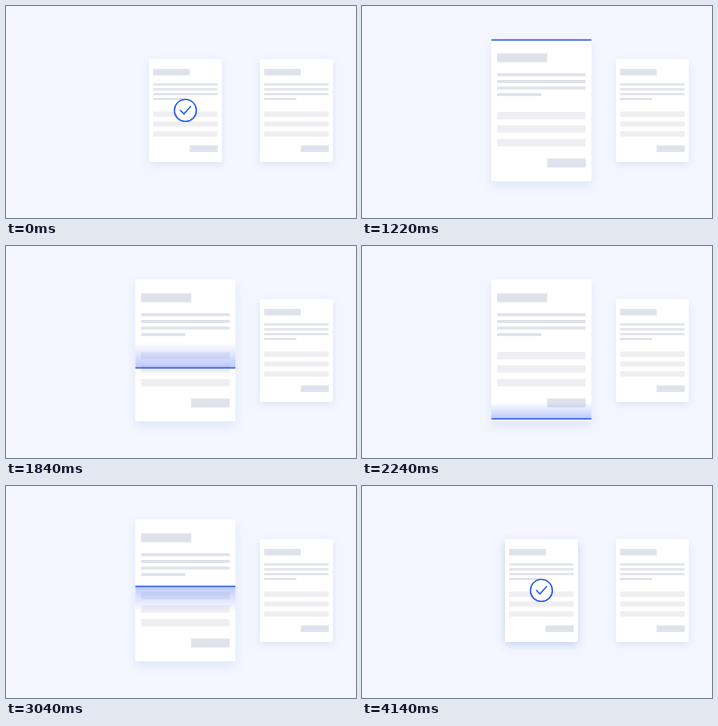
Recreate the animation shown at these times as an HTML page. Size 350 px wide and 212 px high, loop 4.2 s.

```html
<!DOCTYPE html>
<html lang="en">
<head>
<meta charset="utf-8">
<title>Document scan</title>
<style>
html, body { margin: 0; width: 100%; height: 100%; overflow: hidden; background: #f4f7ff; }
svg { display: block; width: 350px; height: 212px; }
.paper { fill: #fff; filter: drop-shadow(0 3px 4px rgba(70, 100, 190, .13)); }
.ink { fill: #dfe1eb; }
.field { fill: #efeff3; }
</style>
</head>
<body>
<svg viewBox="0 0 350 212">
  <defs>
    <!-- Page centred on its own origin -->
    <g id="page">
      <rect class="paper" x="-36.4" y="-51.5" width="72.8" height="103" rx=".8"/>
      <g class="ink">
        <rect x="-32.2" y="-41.5" width="36.5" height="6.5"/>
        <rect x="-32.2" y="-27" width="64.4" height="2.1"/>
        <rect x="-32.2" y="-22.1" width="64.4" height="2.1"/>
        <rect x="-32.2" y="-17.3" width="64.4" height="2.1"/>
        <rect x="-32.2" y="-12.5" width="32.2" height="2.1"/>
        <rect x="4.2" y="35" width="28" height="6.5"/>
      </g>
      <g class="field">
        <rect x="-32.2" y="1.1" width="64.4" height="5.4"/>
        <rect x="-32.2" y="10.9" width="64.4" height="5.4"/>
        <rect x="-32.2" y="20.8" width="64.4" height="5.4"/>
      </g>
    </g>
    <linearGradient id="glow" x1="0" y1="0" x2="0" y2="1">
      <stop offset="0" stop-color="#4468f5" stop-opacity="0"/>
      <stop offset="1" stop-color="#4468f5" stop-opacity=".36"/>
    </linearGradient>
  </defs>
  <use id="next" href="#page"/>
  <use id="main" href="#page"/>
  <g id="done">
    <use href="#page"/>
    <g id="check" fill="none" stroke="#2b5cf0" stroke-width="1.4">
      <circle r="11" fill="#fff"/>
      <path d="M-4.8 .2 L-1.5 3.6 L5 -3.8" stroke-linecap="round" stroke-linejoin="round"/>
    </g>
  </g>
  <g id="scan">
    <rect id="trail" x="-50" y="-1" width="100" height="1" fill="url(#glow)"/>
    <rect x="-50" y="-.75" width="100" height="1.5" fill="#3d64e6"/>
  </g>
</svg>
<script>
const LOOP = 4200, CX = 179.4, CY = 104.4, GAP = 111, TRAVEL = 150, ZOOM = 1.375;
const TOP = 33.9, BOTTOM = 174.2, TRAIL = 25;

const $ = id => document.getElementById(id);
const clamp = v => Math.min(1, Math.max(0, v));
const span = (t, a, b) => clamp((t - a) / (b - a));
const inOut = u => u < .5 ? 4 * u ** 3 : 1 - 4 * (1 - u) ** 3;
const smooth = u => u * u * (3 - 2 * u);
const place = (id, x, y, sx = 1, sy = sx) =>
  $(id).setAttribute('transform', `translate(${x} ${y}) scale(${sx} ${sy})`);
const fade = (id, v) => $(id).setAttribute('opacity', v);

function draw(t) {
  // Carousel: finished page leaves, waiting page takes its place, a new one enters
  const slide = span(t, 20, 600), move = inOut(slide);
  const sliding = slide < 1;
  place('done', CX - TRAVEL * move, CY);
  place('main', CX + GAP * (1 - move), CY);
  place('next', CX + GAP + TRAVEL * (1 - move), CY);
  fade('done', sliding ? 1 - span(slide, .05, .7) : 0);
  fade('next', span(slide, .5, 1));

  // Zoom in for the scan, back out afterwards
  const zoom = inOut(span(t, 600, 1110)) - inOut(span(t, 3680, 4150));
  if (!sliding) place('main', CX, CY, 1 + (ZOOM - 1) * zoom);

  // Confirmation mark
  const pop = smooth(span(t, 3880, 4130));
  if (pop > 0) {
    place('done', CX, CY, 1 + (ZOOM - 1) * zoom);
    fade('done', 1);
  }
  place('check', 0, 0, sliding ? 1 : .6 + .4 * pop);
  fade('check', sliding ? 1 : pop);

  // Scanner: one pass down, one pass up, trail behind the line
  const up = t >= 2410;
  const pass = up ? span(t, 2410, 3650) : span(t, 1155, 2410);
  const p = inOut(pass);
  const y = TOP + (BOTTOM - TOP) * (up ? 1 - p : p);
  const trail = TRAIL * smooth(span(pass, .2, .5)) * (1 - smooth(span(pass, .78, 1)));
  place('scan', CX, y, 1, up ? -1 : 1);
  $('trail').setAttribute('y', -trail);
  $('trail').setAttribute('height', trail);
  fade('scan', span(t, 1110, 1210) * (1 - span(t, 3590, 3680)));
}

const start = performance.now();
function tick() {
  draw((performance.now() - start) % LOOP);
  requestAnimationFrame(tick);
}
tick();
</script>
</body>
</html>
```
